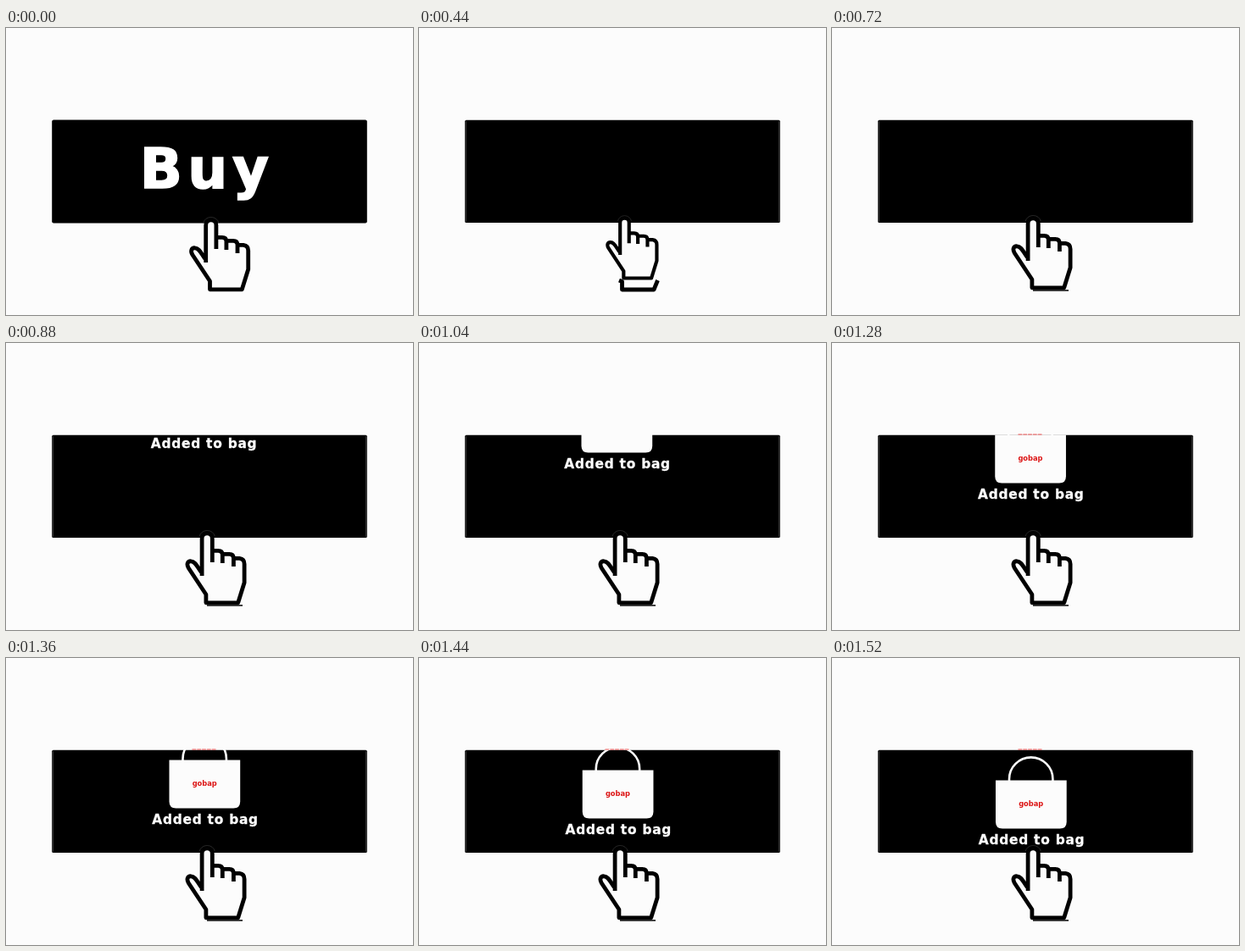
An HTML page for the animation above (3.44 s loop, 480 by 339 pixels).

```html
<!DOCTYPE html>
<html lang="en">
<head>
<meta charset="utf-8">
<title>Buy button</title>
<style>
  html, body { margin: 0; width: 100%; height: 100%; overflow: hidden; background: #fcfcfc; }
  svg { display: block; width: 100%; height: 100%; }
  text { font-family: "DejaVu Sans", Verdana, sans-serif; font-weight: 700; text-anchor: middle; }
  .label { fill: #fff; stroke: #fff; }
  .line { fill: none; stroke: #000; stroke-width: 4.8; stroke-linejoin: round; }
</style>
</head>
<body>
<svg viewBox="0 0 480 339">
  <defs>
    <clipPath id="window"><rect x="54" y="107.5" width="372" height="122"/></clipPath>
    <g id="hand">
      <path fill="#fcfcfc" d="M235.7 276V233a6.1 6.1 0 0 1 12.2 0V247L260 250 273 254 286 260V285L279 309H240V299L219 267Q217 258 224 260Z"/>
      <path fill="none" stroke="#333" stroke-width=".8" d="M232.7 230.5a9.2 8.2 0 0 1 18.2 0"/>
      <path class="line" d="M235.7 277V233a6.1 6.1 0 0 1 12.2 0V261
        M247.9 247.3h7q5 0 5 5V262
        M260 251.3h8q5 0 5 5V266
        M273 256.3h7Q285.7 257 285.7 263V285L278.3 308.8H240.5V299L220 268C217 263 219 259.3 223 259.8C229 260.3 231 269 236 274"/>
    </g>
  </defs>

  <g id="idle">
    <rect x="54.2" y="108.5" width="371.6" height="122" rx="2"/>
    <text class="label" x="237" y="188.5" font-size="66" letter-spacing="6" stroke-width="1.6">Buy</text>
    <use href="#hand"/>
  </g>

  <g id="active">
    <rect x="54.2" y="108.8" width="371.6" height="121.2" rx="1.5"/>
    <path d="M55.5 110V229M424.5 110V229" stroke="#555" stroke-width=".6"/>
    <g clip-path="url(#window)">
      <g id="drop">
        <path d="M209 146V143a25.7 25.7 0 0 1 51.4 0V146" fill="none" stroke="#fcfcfc" stroke-width="2.6"/>
        <path d="M193 144.5h83.7v49q0 8 -8 8H201q-8 0 -8 -8Z" fill="#fcfcfc"/>
        <text x="234.7" y="174.8" font-size="8.3" fill="#dc1414">gobap</text>
        <text class="label" x="235.6" y="219.6" font-size="15.4" letter-spacing=".75" stroke-width=".3">Added to bag</text>
      </g>
    </g>
    <path id="streak" d="M219.5 108H248" stroke="#e22" stroke-width="1.2" stroke-dasharray="4.8 1" opacity=".75"/>
  </g>

  <g id="pressed">
    <use href="#hand" transform="translate(33.3 28.4) scale(.865)"/>
    <path class="line" stroke-linejoin="miter" d="M236 298L239.5 299.5V309H277L281.5 298"/>
  </g>
  <g id="released">
    <use href="#hand" transform="translate(-4.6 -2)"/>
    <path d="M237 310H279" stroke="#000" stroke-width="1.4"/>
  </g>
</svg>
<script>
  const LOOP = 3440, PRESS = 440, RELEASE = 720, STREAK = 1080, LANDED = 1520, TICK = 40;
  const byId = id => document.getElementById(id);

  function loop(id, frames) {
    const keyframes = frames.map(({ at, ...rest }) => ({ offset: at / LOOP, ...rest }));
    byId(id).animate(keyframes, { duration: LOOP, iterations: Infinity }).startTime = 0;
  }

  function show(id, from, to) {
    const frames = [];
    const hold = (at, visibility) => frames.push({ at, visibility, easing: "step-end" });
    if (from > 0) hold(0, "hidden");
    hold(from, "visible");
    if (to < LOOP) hold(to, "hidden");
    hold(LOOP, to < LOOP ? "hidden" : "visible");
    loop(id, frames);
  }

  show("idle", 0, PRESS);
  show("active", PRESS, LOOP);
  show("pressed", PRESS, RELEASE);
  show("released", RELEASE, LOOP);
  show("streak", STREAK, LOOP);

  // The bag and its caption slide down together in even ticks.
  const above = "translate(-2.5px, -120px)", rest = "translate(0px, 0px)";
  loop("drop", [
    { at: 0, transform: above, easing: "step-end" },
    { at: RELEASE, transform: above, easing: `steps(${(LANDED - RELEASE) / TICK}, end)` },
    { at: LANDED, transform: rest },
    { at: LOOP, transform: rest }
  ]);
</script>
</body>
</html>
```
